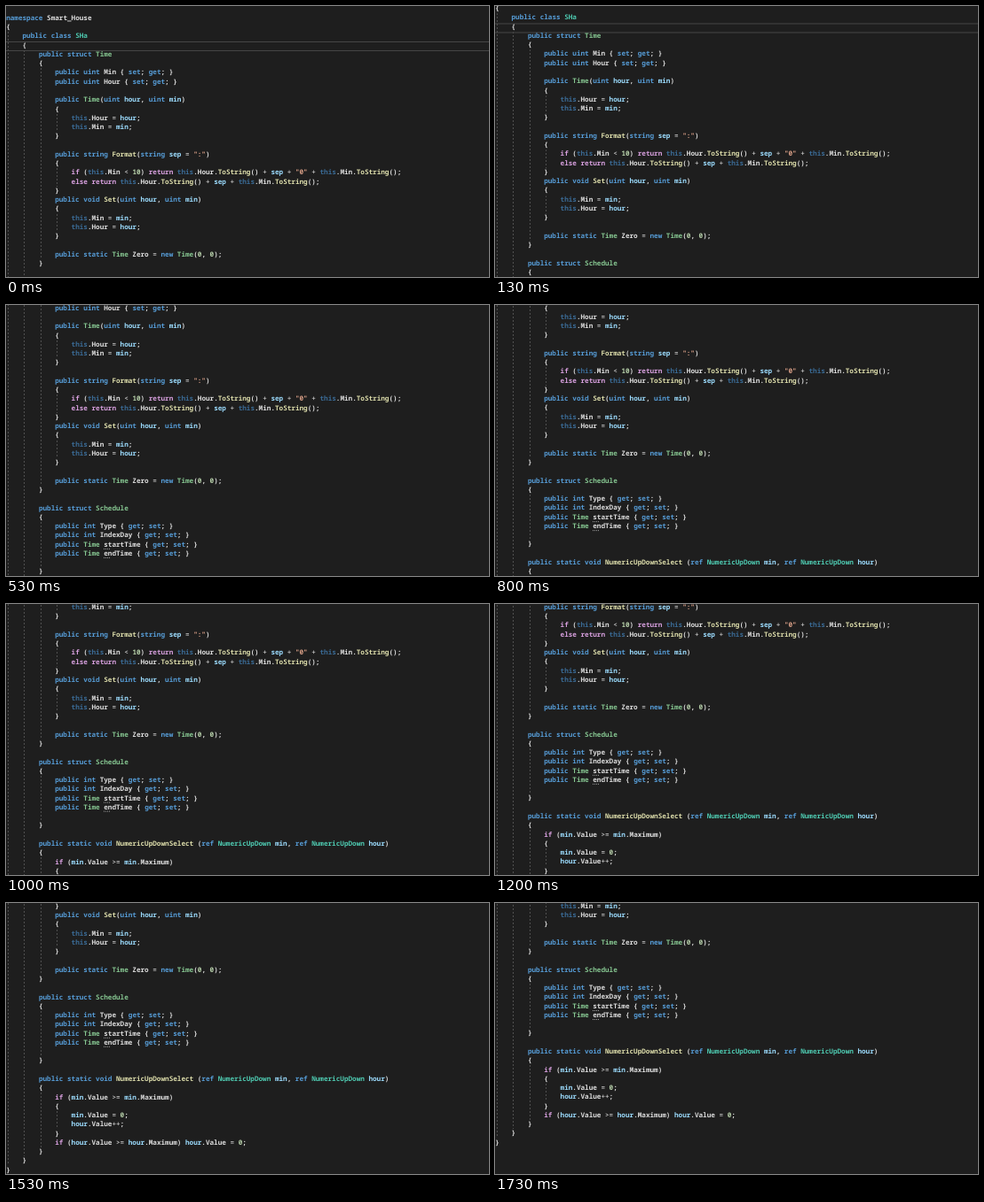
An HTML page for the animation above (1.79 s loop, 544 px wide and 306 px high).

```html
<!DOCTYPE html>
<html lang="en">
<head>
<meta charset="utf-8">
<title>Code scroll</title>
<style>
  html, body { margin: 0; width: 100%; height: 100%; overflow: hidden; background: #1e1e1e; }
  #stage { position: relative; width: 544px; height: 306px; overflow: hidden; background: #1e1e1e; }
  #doc { position: absolute; left: 0; top: 8.9px; width: 544px; }
  pre {
    position: absolute; left: .2px; top: 0; margin: 0;
    font: 600 7.65px/10.26px "Noto Sans Mono", "DejaVu Sans Mono", monospace;
    font-variant-ligatures: none;
    text-rendering: geometricPrecision;
    color: #dcdcdc;
  }
  .guide {
    position: absolute; width: 1px;
    background: repeating-linear-gradient(#505050 0 2px, transparent 2px 4px);
  }
  #current {
    position: absolute; left: 0; width: 544px; height: 11px; box-sizing: border-box;
    border: solid #464646; border-width: 1px 0;
  }
  .key { color: #569cd6; }
  .self { color: #3a6a94; }
  .flow { color: #d8a0df; }
  .class { color: #4ec9b0; }
  .struct { color: #86c691; }
  .local { color: #9cdcfe; }
  .method { color: #dcdcaa; }
  .string { color: #d69d85; }
  .number { color: #b5cea8; }
  .op { color: #b4b4b4; }
  .hint { position: relative; }
  .hint::after {
    content: ""; position: absolute; left: 0; bottom: 0; width: 8px; height: 1px;
    background: repeating-linear-gradient(90deg, #a0a0a0 0 1px, transparent 1px 2px);
  }
</style>
</head>
<body>
<div id="stage"><div id="doc"><div id="current"></div><pre id="code"></pre></div></div>
<script>
const SOURCE = `namespace Smart_House
{
    public class SHa
    {
        public struct Time
        {
            public uint Min { set; get; }
            public uint Hour { set; get; }

            public Time(uint hour, uint min)
            {
                this.Hour = hour;
                this.Min = min;
            }

            public string Format(string sep = ":")
            {
                if (this.Min < 10) return this.Hour.ToString() + sep + "0" + this.Min.ToString();
                else return this.Hour.ToString() + sep + this.Min.ToString();
            }
            public void Set(uint hour, uint min)
            {
                this.Min = min;
                this.Hour = hour;
            }

            public static Time Zero = new Time(0, 0);
        }

        public struct Schedule
        {
            public int Type { get; set; }
            public int IndexDay { get; set; }
            public Time startTime { get; set; }
            public Time endTime { get; set; }

        }

        public static void NumericUpDownSelect (ref NumericUpDown min, ref NumericUpDown hour)
        {
            if (min.Value >= min.Maximum)
            {
                min.Value = 0;
                hour.Value++;
            }
            if (hour.Value >= hour.Maximum) hour.Value = 0;
        }
    }
}`;

const WORDS = {
  key: "namespace public class struct uint int string void static new ref get set",
  self: "this",
  flow: "if else return",
  class: "SHa NumericUpDown",
  struct: "Time Schedule",
  local: "min hour sep",
  method: "Format ToString Set NumericUpDownSelect",
  hint: "startTime endTime"
};
const kinds = new Map();
for (const [kind, words] of Object.entries(WORDS)) {
  for (const word of words.split(" ")) kinds.set(word, kind);
}

const LINE = 10.26, CHAR = 4.59, LOOP = 1790;
const doc = document.getElementById("doc");
const code = document.getElementById("code");

function kindOf(token) {
  if (token[0] === '"') return "string";
  if (/^\d/.test(token)) return "number";
  if (/^[-+<>=]/.test(token)) return "op";
  return kinds.get(token);
}

function highlight() {
  for (const token of SOURCE.match(/"[^"]*"|\w+|[+<>=]+|\s+|[^\w\s]/g)) {
    const kind = kindOf(token);
    if (!kind) { code.append(token); continue; }
    const span = document.createElement("span");
    span.className = kind;
    span.textContent = token;
    code.append(span);
  }
}

// One dashed guide between each pair of braces that stand on their own lines.
function addGuides() {
  const open = [];
  SOURCE.split("\n").forEach((text, row) => {
    const mark = text.trim();
    if (mark === "{") open.push(row);
    if (mark !== "}") return;
    const first = open.pop() + 1;
    const guide = document.createElement("div");
    guide.className = "guide";
    guide.style.left = Math.round(text.indexOf("}") * CHAR + 1.8) + "px";
    guide.style.top = first * LINE + "px";
    guide.style.height = (row - first) * LINE + "px";
    doc.prepend(guide);
  });
}

// The view moves one line per tick at 15 ticks a second, with three brief stalls.
const STALLS = [11, 14, 23];
const ticks = Array.from({ length: 27 }, (_, i) => Math.round(i * 20 / 3) * 10);

function scrollLines(time) {
  const tick = ticks.filter(at => at <= time).length - 1;
  return tick - STALLS.filter(stall => stall <= tick).length;
}

highlight();
addGuides();
document.getElementById("current").style.top = 3 * LINE + .3 + "px";

const start = performance.now();
function draw() {
  const time = (performance.now() - start) % LOOP;
  doc.style.transform = `translateY(${-scrollLines(time) * LINE}px)`;
  requestAnimationFrame(draw);
}
draw();
</script>
</body>
</html>
```
